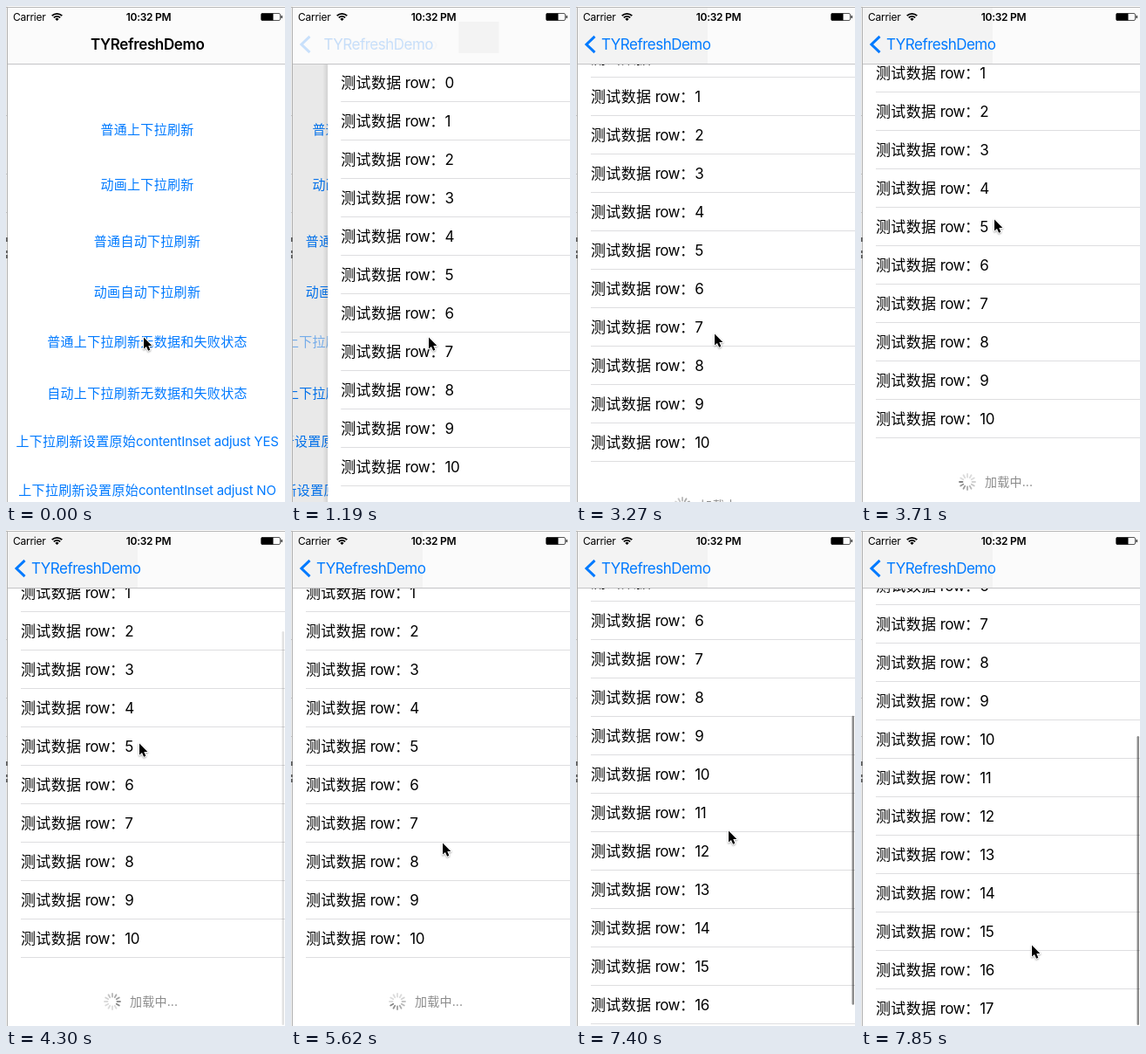
An HTML page with a canvas that plays this animation: 320x568 px, repeating every 8000 ms.

```html
<!DOCTYPE html>
<html lang="zh-CN">
<head>
<meta charset="utf-8">
<style>
  html, body { margin: 0; width: 100%; height: 100%; overflow: hidden; background: #fff; }
  canvas { display: block; }
</style>
</head>
<body>
<canvas id="stage" width="320" height="568"></canvas>
<script>
const ctx = document.getElementById('stage').getContext('2d');
const LOOP = 8000, START = 900, STEP = 147.8, SLACK = 12;
const LEFT = 2, TOP = 66, ROW = 44, LOADED = 36;
const BLUE = '#007aff';
const FONT = 'Inter, "Noto Sans CJK SC", "Noto Sans CJK", sans-serif';

const MENU = [
  ['普通上下拉刷新', 141], ['动画上下拉刷新', 204],
  ['普通自动下拉刷新', 269], ['动画自动下拉刷新', 327],
  ['普通上下拉刷新无数据和失败状态', 384], ['自动上下拉刷新无数据和失败状态', 443],
  ['上下拉刷新设置原始contentInset adjust YES', 498],
  ['上下拉刷新设置原始contentInset adjust NO', 554]
];
const PRESSED = 4;

// Tracks: [step, value, ...]; values are linear between the points.
const POINTER = [[2, 157, 378], [3, 157, 378], [7, 166, 256], [12, 160, 437], [15, 160, 430],
  [18, 153, 262], [19, 152, 243], [23, 152, 243], [30, 173, 357], [32, 173, 357],
  [36, 166, 376], [37, 166, 376], [38, 165, 362], [41, 159, 264], [43, 166, 290],
  [46, 190, 450], [47, 195, 474]];
const SCROLL = [[14, 0], [15, 4], [18, 76], [19, 55], [20, 60], [37, 60], [38, 76],
  [41, 169], [43, 228], [45, 268], [47, 288]];

function track(points, n) {
  const i = points.findIndex(p => p[0] >= n);
  if (i < 0) return points[points.length - 1].slice(1);
  if (i === 0) return points[0].slice(1);
  const a = points[i - 1], b = points[i], k = (n - a[0]) / (b[0] - a[0]);
  return a.slice(1).map((v, j) => v + (b[j + 1] - v) * k);
}

function rect(x, y, w, h, color) {
  ctx.fillStyle = color;
  ctx.fillRect(x, y, w, h);
}

// Latin runs are set slightly tight, Chinese runs slightly loose.
function text(str, x, y, size, options = {}) {
  const { color = '#000', weight = 400, center = false, alpha = 1, tracking = -0.022 } = options;
  ctx.font = `${weight} ${size}px ${FONT}`;
  const runs = str.match(/[\u2e80-\uffff]+|[^\u2e80-\uffff]+/g).map(s => {
    const spacing = (s.charCodeAt(0) > 0x2e80 ? 0.02 : tracking) * size + 'px';
    ctx.letterSpacing = spacing;
    return { s, spacing, width: ctx.measureText(s).width };
  });
  if (center) x -= runs.reduce((sum, r) => sum + r.width, 0) / 2;
  ctx.save();
  ctx.globalAlpha *= alpha;
  ctx.fillStyle = color;
  for (const r of runs) {
    ctx.letterSpacing = r.spacing;
    ctx.fillText(r.s, x, y);
    x += r.width;
  }
  ctx.restore();
}

function drawMenu(n, rest) {
  const shift = -96 * (1 - rest);
  MENU.forEach(([label, y], i) => {
    const alpha = i === PRESSED && n >= 0 ? Math.min(1, 0.2 + 0.15 * n) : 1;
    text(label, 162 + shift, y + 5.5, 15, { color: BLUE, center: true, alpha, tracking: -0.014 });
  });
  rect(0, 0, 320, 568, `rgba(0,0,0,${0.1 * (1 - rest)})`);
}

function drawSpinner(x, y, n) {
  const head = Math.floor(n * STEP * 12 / 1000);
  ctx.lineWidth = 1.8;
  ctx.lineCap = 'round';
  for (let i = 0; i < 12; i++) {
    const a = i * Math.PI / 6, age = (((head - i) % 12) + 12) % 12;
    ctx.strokeStyle = `rgba(110,110,110,${Math.max(0.25, 0.85 - age * 0.09)})`;
    ctx.beginPath();
    ctx.moveTo(x + 5.5 * Math.sin(a), y - 5.5 * Math.cos(a));
    ctx.lineTo(x + 9 * Math.sin(a), y - 9 * Math.cos(a));
    ctx.stroke();
  }
}

function drawIndicator(n, scroll) {
  const bar = (top, height, alpha) => {
    ctx.fillStyle = `rgba(0,0,0,${alpha})`;
    ctx.beginPath();
    ctx.roundRect(316.5, top, 2.5, height, 1.25);
    ctx.fill();
  };
  if (n >= 38) bar(69 + 0.58 * scroll, 331, 0.45);
  else if (n >= 20 && n < 24) bar(116, 451, 0.45 * (24 - n) / 4);
}

function drawList(n, rest) {
  const [scroll] = track(SCROLL, n), x = 320 * rest;
  ctx.save();
  ctx.translate(x, 0);
  if (rest > 0.002) {
    const shade = ctx.createLinearGradient(LEFT - 6, 0, LEFT, 0);
    shade.addColorStop(0, 'rgba(0,0,0,0)');
    shade.addColorStop(1, 'rgba(0,0,0,.1)');
    rect(LEFT - 6, TOP, 6, 502, shade);
  }
  rect(LEFT, TOP, 320, 502, '#fff');
  const count = n >= LOADED ? 18 : 11;
  for (let i = 0; i < count; i++) {
    const y = Math.round(TOP + i * ROW - scroll);
    text('测试数据 row：' + i, 17, y + 28, 17, { tracking: -0.03 });
    rect(17, y + 43, 303, 1, '#dedee0');
  }
  if (n < LOADED && scroll > 0) {
    drawSpinner(122, 600 - scroll, n);
    text('加载中...', 142, 605 - scroll, 14, { color: '#8c8c8c', tracking: 0 });
  }
  drawIndicator(n, scroll);
  ctx.restore();
}

function drawStatus() {
  text('Carrier', 8, 16.5, 12);
  text('10:32 PM', 163.5, 16.5, 12, { weight: 600, center: true });
  ctx.strokeStyle = '#000';
  ctx.lineCap = 'butt';
  ctx.lineWidth = 1.8;
  for (const r of [5.2, 8.2]) {
    ctx.beginPath();
    ctx.arc(58.5, 17, r, -Math.PI * 0.75, -Math.PI * 0.25);
    ctx.stroke();
  }
  ctx.fillStyle = '#000';
  ctx.beginPath();
  ctx.moveTo(58.5, 17);
  ctx.arc(58.5, 17, 3, -Math.PI * 0.75, -Math.PI * 0.25);
  ctx.fill();
  ctx.lineWidth = 1;
  ctx.strokeStyle = '#555';
  ctx.beginPath();
  ctx.roundRect(292.5, 8.5, 22, 8, 1.5);
  ctx.stroke();
  rect(293, 8.5, 13.5, 8, '#000');
  rect(315.5, 11, 1.5, 3, '#333');
}

function drawNavBar(n, rest) {
  rect(LEFT, 2, 318, 64, '#fbfbfb');
  if (n >= 15) rect(LEFT, 2, 149, 64, '#f3f3f3');
  else if (n >= 2) rect(157 + 281 * rest, 18, 46, 36, '#f3f3f3');
  rect(LEFT, TOP, 318, 1, '#c4c4c6');
  drawStatus();
  const x = 29 + 68 * rest, alpha = (1 - rest) ** 12;
  text('TYRefreshDemo', x, 50, 17, { weight: 600, alpha: rest ** 2 });
  text('TYRefreshDemo', x, 50, 17, { color: BLUE, alpha, tracking: -0.03 });
  ctx.save();
  ctx.globalAlpha = alpha;
  ctx.strokeStyle = BLUE;
  ctx.lineWidth = 3;
  ctx.lineJoin = 'miter';
  ctx.beginPath();
  ctx.moveTo(21.5, 34.8);
  ctx.lineTo(12, 44);
  ctx.lineTo(21.5, 53.2);
  ctx.stroke();
  ctx.restore();
}

function drawWindowEdge() {
  rect(0, 0, 2, 568, '#f2f2f2');
  rect(1, 1, 1, 567, '#b0b0b0');
  rect(0, 1, 320, 1, '#b8b8b8');
  for (const y of [125, 192, 236]) rect(0, y, 1, 1, '#c8c8c8');
  for (const [y, h] of [[265, 5], [280, 3], [285, 4]]) rect(0, y, 2, h, '#666');
}

const ARROW = new Path2D('M0 0V13L3 10.4L5.1 15.2L7.3 14.2L5.3 9.5H9.4Z');
function drawPointer(n) {
  const [x, y] = track(POINTER, n);
  ctx.save();
  ctx.translate(Math.round(x) + 1, Math.round(y) + 1.5);
  ctx.shadowColor = 'rgba(0,0,0,.35)';
  ctx.shadowBlur = 2;
  ctx.shadowOffsetY = 1;
  ctx.strokeStyle = '#fff';
  ctx.lineWidth = 2;
  ctx.lineJoin = 'round';
  ctx.stroke(ARROW);
  ctx.shadowColor = 'transparent';
  ctx.fillStyle = '#000';
  ctx.fill(ARROW);
  ctx.restore();
}

function draw(time) {
  const n = Math.max(-1, Math.floor((time - START + SLACK) / STEP));
  const k = n < 1 ? 0 : 0.95 + 2.65 * (n - 1);
  const rest = n > 6 ? 0 : (1 + k) * Math.exp(-k);
  rect(0, 0, 320, 568, '#fff');
  ctx.save();
  ctx.beginPath();
  ctx.rect(LEFT, TOP, 318, 502);
  ctx.clip();
  if (rest > 0) drawMenu(n, rest);
  if (rest < 1) drawList(n, rest);
  ctx.restore();
  drawNavBar(n, rest);
  drawWindowEdge();
  drawPointer(n);
}

const begin = performance.now();
function frame() {
  draw((performance.now() - begin) % LOOP);
  requestAnimationFrame(frame);
}
frame();
</script>
</body>
</html>
```
